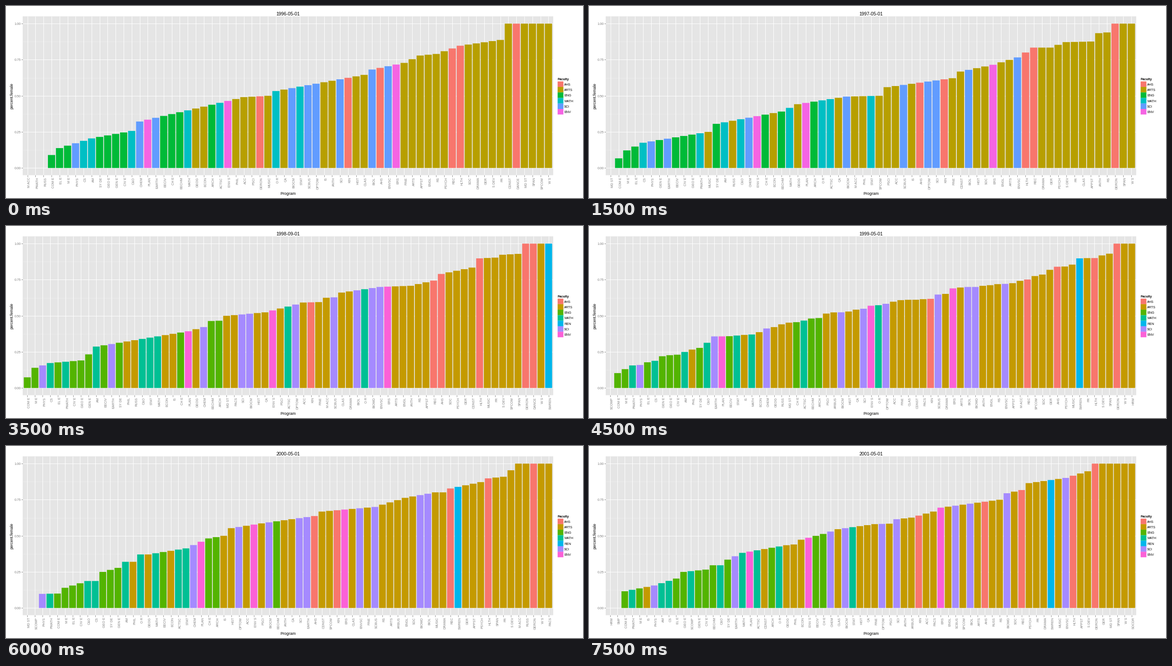
Recreate the animation shown at these times as a matplotlib script. Size 1280x427 px, loop 8000 ms.

```python
import matplotlib.pyplot as plt
import numpy as np
from matplotlib.animation import FuncAnimation
from matplotlib.patches import Rectangle

W, H, DPI = 1280, 427, 64
LEFT, RIGHT, TOP, BOTTOM = 37, 1214, 23, 376.3
Y_ZERO, Y_ONE = 360.3, 39.2
PX = 72 / DPI
GREY = "#7F7F7F"

plt.rcParams["font.family"] = "Liberation Sans"

FACULTY = {
    "AHS": "GERON,KIN,AHS,REC,HLTH,DANCE",
    "ENG": "COM E,EL E,M E,SY DE,GEO E,GEN E,CIV E,EECIV,CH E,EECHM,ARCH",
    "MATH": "PMATH,CS,AM,C&O,MATH,ACTSC,O R,STAT,SCOMP",
    "REN": "SWREN",
    "SCI": "PHYS,CHEM,EARTH,BIOCM,SCBUS,OPTOM,SCI,BIOL,ENVSC,BIOMD",
    "ENV": "PLAN,ENV S,ERS",
}
FACULTY_OF = {p: f for f, codes in FACULTY.items() for p in codes.split(",")}

SIX = dict(AHS="#F8766D", ARTS="#B79F00", ENG="#00BA38", MATH="#00BFC4",
           SCI="#619CFF", ENV="#F564E3")
SEVEN = dict(AHS="#F8766D", ARTS="#C49A00", ENG="#53B400", MATH="#00C094",
             REN="#00B6EB", SCI="#A58AFF", ENV="#FB61D7")

terms = {}


def term(step, codes, knots):
    """Rank the codes; shares (per mille) run straight between the knots."""
    names = codes.split(",")
    at = [names.index(n) for n in knots]
    shares = np.interp(range(len(names)), at, list(knots.values()))
    terms[step] = dict(zip(names, shares))


term(0, "M ACC,PMATH,RUSS,COM E,EL E,M E,PHYS,CS,AM,SY DE,GEO E,GEN E,CIV E,"
     "C&O,CHEM,PLAN,EARTH,EECIV,CH E,EECHM,MATH,GEOG,ECON,ARCH,ACTSC,ENV S,"
     "PHIL,ACC,PSCI,GERON,MUSIC,O R,CA,BIOCM,STAT,SCBUS,OPTOM,IS,ANTH,SCI,"
     "KIN,HIST,CLAS,BIOL,AHS,ENVSC,ERS,FINE,ARTS,APPST,ENGL,RS,PSYCH,REC,"
     "HLTH,SOC,DRAMA,GER,S DEV,FR,CDNST,DANCE,MD ST,SPAN,SPCOM,W S",
     {"RUSS": 0, "COM E": 90, "EL E": 138, "AM": 205, "C&O": 257,
      "CHEM": 322, "ECON": 425, "ACC": 491, "MUSIC": 500, "O R": 533,
      "CLAS": 645, "BIOL": 682, "FINE": 728, "APPST": 779, "RS": 790,
      "HLTH": 847, "FR": 887, "CDNST": 1000})

term(3, "MD ST,COM E,M E,EL E,CS,PHYS,GEN E,EARTH,EECIV,CIV E,GEO E,PMATH,"
     "MUSIC,SY DE,AM,RUSS,C&O,CHEM,ENV S,CH E,ECON,EECHM,MATH,GEOG,PLAN,"
     "ARCH,O R,ACTSC,CA,BIOCM,M ACC,PHIL,STAT,SPCOM,PSCI,ACC,SCBUS,IS,AHS,"
     "OPTOM,SCI,KIN,FINE,CDNST,BIOL,HIST,SOC,ERS,ENGL,ARTS,ENVSC,HLTH,REC,"
     "DRAMA,GER,PSYCH,S DEV,FR,CLAS,APPST,ANTH,RS,GERON,SPAN,W S",
     {"MD ST": 0, "COM E": 67, "M E": 122, "CS": 175, "MUSIC": 250,
      "SY DE": 306, "EECHM": 391, "GEOG": 442, "BIOCM": 495, "SPCOM": 500,
      "PSCI": 560, "FINE": 622, "CDNST": 668, "ERS": 715, "ENVSC": 766,
      "REC": 834, "GER": 834, "S DEV": 872, "APPST": 876, "ANTH": 934,
      "RS": 939, "GERON": 1000})

term(5, "COM E,EL E,M E,PHYS,CS,PMATH,CIV E,C&O,GEN E,EECIV,AM,GEO E,SY DE,"
     "PHIL,RUSS,EARTH,CHEM,CH E,STAT,MATH,ECON,GEOG,EECHM,PLAN,MD ST,IS,"
     "ARCH,ENV S,BIOCM,ACTSC,SCI,O R,CA,HIST,PSCI,ACC,SCBUS,OPTOM,KIN,FINE,"
     "DRAMA,BIOL,CDNST,ENVSC,CLAS,ERS,ENGL,BIOMD,ANTH,ARTS,REC,AHS,APPST,"
     "SOC,RS,PSYCH,SPAN,MUSIC,FR,GER,HLTH,S DEV,GERON,DANCE,SPCOM,W S",
     {"COM E": 83, "EL E": 120, "GEN E": 233, "SY DE": 275, "RUSS": 333,
      "EARTH": 333, "MATH": 391, "PLAN": 409, "ENV S": 509, "CA": 535,
      "HIST": 556, "SCBUS": 566, "KIN": 600, "FINE": 628, "ENVSC": 693,
      "CLAS": 693, "ARTS": 724, "APPST": 764, "RS": 772, "PSYCH": 817,
      "GER": 868, "HLTH": 897, "GERON": 925, "DANCE": 1000})

term(7, "COM E,M E,PHYS,CS,EL E,PMATH,CIV E,GEO E,GEN E,AM,EECIV,EARTH,SY DE,"
     "PHIL,RUSS,C&O,STAT,MATH,ECON,IS,CH E,PLAN,GEOG,CHEM,EECHM,ARCH,MD ST,"
     "PACS,SCI,BIOCM,HIST,CA,ENV S,PSCI,ACTSC,OPTOM,ACC,KIN,FINE,M ACC,"
     "SCBUS,CLAS,DRAMA,BIOL,O R,BIOMD,ENVSC,ERS,ARTS,ENGL,ANTH,RS,APPST,"
     "REC,AHS,SOC,PSYCH,GER,CDNST,HLTH,MUSIC,FR,S DEV,SPCOM,SPAN,"
     "GERON,DANCE,W S,SWREN",
     {"COM E": 74, "M E": 140, "CS": 173, "GEO E": 191, "GEN E": 233,
      "AM": 287, "PLAN": 393, "CHEM": 422, "EECHM": 464, "ARCH": 466,
      "MD ST": 500, "CA": 524, "ACTSC": 564, "ACC": 592, "FINE": 595,
      "M ACC": 625, "SCBUS": 628, "CLAS": 661, "ENVSC": 700, "ANTH": 708,
      "REC": 744, "AHS": 790, "CDNST": 834, "HLTH": 898, "FR": 903,
      "S DEV": 923, "SPAN": 929, "GERON": 1000})

term(10, "SCOMP,COM E,M E,PMATH,PHYS,EL E,CS,GEN E,AM,PHIL,GEO E,CIV E,SY DE,"
     "C&O,PLAN,IS,STAT,MATH,EARTH,EECIV,ECON,CHEM,ACTSC,GEOG,MD ST,EECHM,"
     "CH E,ARCH,RUSS,PSCI,CDNST,O R,ARBUS,BIOCM,HIST,CA,SCI,OPTOM,ENV S,"
     "CLAS,ACC,FINE,KIN,DRAMA,SCBUS,PACS,ERS,ARTS,SPCOM,BIOMD,ANTH,BIOL,"
     "ENGL,RS,APPST,ENVSC,REC,SOC,M ACC,GER,MUSIC,SWREN,PSYCH,AHS,FR,HLTH,"
     "S DEV,SPAN,GERON,W S,HRM",
     {"SCOMP": 0, "COM E": 118, "M E": 126, "AM": 231, "SY DE": 260,
      "PLAN": 340, "IS": 364, "ECON": 397, "GEOG": 429, "MD ST": 429,
      "EECHM": 490, "CDNST": 500, "O R": 518, "HIST": 535, "OPTOM": 586,
      "CLAS": 586, "KIN": 630, "ERS": 684, "SPCOM": 700, "APPST": 723,
      "ENVSC": 732, "M ACC": 801, "SWREN": 847, "AHS": 865, "FR": 898,
      "HLTH": 901, "SPAN": 931, "GERON": 1000})

term(12, "MD ST,SCOMP,PHYS,PMATH,COM E,M E,EL E,CIV E,C&O,CS,GEO E,SY DE,"
     "GEN E,AM,PHIL,O R,GEOG,MATH,EECIV,ECON,ACTSC,STAT,CHEM,PLAN,CH E,ARCH,"
     "IS,HIST,OPTOM,ACC,ENV S,PSCI,BIOCM,EECHM,ANTH,CA,SCI,EARTH,AHS,CDNST,"
     "SPCOM,KIN,ERS,CLAS,ENVSC,FINE,SCBUS,RS,ARTS,ARBUS,ENGL,SOC,BIOMD,BIOL,"
     "MUSIC,DRAMA,REC,SWREN,GER,APPST,PSYCH,HLTH,SPAN,FR,S DEV,"
     "M ACC,RUSS,GERON,W S,PACS",
     {"SCOMP": 0, "PHYS": 98, "COM E": 100, "M E": 140, "C&O": 187,
      "CS": 187, "GEO E": 250, "GEN E": 278, "AM": 320, "PHIL": 320,
      "O R": 371, "GEOG": 371, "STAT": 413, "CH E": 482, "IS": 500,
      "HIST": 553, "PSCI": 586, "AHS": 637, "CDNST": 668, "SCBUS": 700,
      "ENGL": 763, "MUSIC": 801, "DRAMA": 801, "REC": 828, "PSYCH": 872,
      "HLTH": 898, "FR": 909, "S DEV": 954, "M ACC": 1000})

term(15, "HRM,SMF,COM E,PMATH,M E,IS,PHYS,AM,CS,EL E,GEO E,SCOMP,GEN E,CIV E,"
     "EECHM,C&O,SY DE,EARTH,MATH,PLAN,ACTSC,CDNST,ARCH,O R,GEOG,PHIL,ECON,"
     "ENV S,EECIV,CH E,CHEM,CLAS,BIOCM,STAT,HIST,CA,FINE,OPTOM,PSCI,SCI,"
     "ANTH,ARBUS,KIN,ACC,PACS,ERS,ENGL,SCBUS,SPCOM,BIOL,ARTS,AHS,RUSS,RS,"
     "BIOMD,SOC,REC,PSYCH,FR,DRAMA,SWREN,MUSIC,ENVSC,HLTH,APPST,S DEV,"
     "GERON,GER,MD ST,SPAN,W S,SOCDR",
     {"SMF": 0, "COM E": 116, "PHYS": 156, "EL E": 204, "GEO E": 250,
      "CIV E": 266, "EECHM": 296, "C&O": 296, "SY DE": 335, "MATH": 382,
      "GEOG": 435, "PHIL": 440, "ECON": 473, "CH E": 513, "CLAS": 546,
      "FINE": 581, "PSCI": 584, "SCI": 615, "ARBUS": 626, "PACS": 668,
      "ERS": 695, "RS": 750, "BIOMD": 795, "REC": 817, "PSYCH": 865,
      "ENVSC": 901, "S DEV": 947, "GERON": 1000})


def ranking(step):
    """Programs and shares at a step, in ascending order of share."""
    a = max(k for k in terms if k <= step)
    b = min(k for k in terms if k >= step)
    if a == b:
        return list(terms[a].items())
    near, far = (a, b) if step - a <= b - step else (b, a)
    mix = abs(step - near) / (b - a)

    def share(name, v):
        if v in (0, 1000):
            return v
        return v + mix * (terms[far].get(name, v) - v)

    rows = [(n, share(n, v)) for n, v in terms[near].items()]
    return sorted(rows, key=lambda r: r[1])


fig = plt.figure(figsize=(W / DPI, H / DPI), dpi=DPI, facecolor="white")
ax = fig.add_axes([0, 0, 1, 1])


def y_of(share):
    return Y_ZERO + (Y_ONE - Y_ZERO) * share


def box(x, y, w, h, color, z=1):
    ax.add_patch(Rectangle((x, y), w, h, fc=color, lw=0, zorder=z,
                           snap=False))


def label(x, y, s, px, color="black", ha="left", **kw):
    ax.text(x, y, s, fontsize=px * PX, color=color, ha=ha, va="baseline",
            rotation_mode="anchor", **kw)


def legend(colors):
    key = 12.27
    top = 204.5 - key * len(colors) / 2
    label(1224, top - 2.5, "Faculty", 7.2, weight="bold")
    for i, (name, color) in enumerate(colors.items()):
        y = top + i * key
        box(1223.7, y, 12.8, key, color)
        label(1238, y + key / 2 + 2.9, name, 7.3)


def draw(step):
    ax.clear()
    ax.set(xlim=(0, W), ylim=(H, 0))
    ax.axis("off")
    box(LEFT, TOP, RIGHT - LEFT, BOTTOM - TOP, "#E5E5E5")

    rows = ranking(step)
    colors = SIX if step < 7 else SEVEN
    pitch = (RIGHT - LEFT) / (len(rows) + 0.2)
    xs = [LEFT + (0.6 + i) * pitch for i in range(len(rows))]

    ax.hlines([y_of(s / 8) for s in (1, 3, 5, 7)], LEFT, RIGHT,
              color="#F2F2F2", lw=0.6 * PX, zorder=2)
    majors = [y_of(q / 4) for q in range(5)]
    ax.hlines(majors, LEFT, RIGHT, color="white", lw=PX, zorder=2)
    ax.vlines(xs, TOP, BOTTOM, color="white", lw=PX, zorder=2)
    ax.hlines(majors, LEFT - 3.2, LEFT, color=GREY, lw=0.9 * PX)
    ax.vlines(xs, BOTTOM, BOTTOM + 3.2, color=GREY, lw=0.9 * PX)

    for x, (name, share) in zip(xs, rows):
        y = y_of(share / 1000)
        color = colors[FACULTY_OF.get(name, "ARTS")]
        if share:
            box(x - 0.45 * pitch, y, 0.9 * pitch, Y_ZERO - y, color, 3)
        label(x + 5.7, 381, name, 7.2, GREY, "right", rotation=90)

    for q, y in enumerate(majors):
        label(33, y + 2.8, f"{q / 4:.2f}", 7.4, GREY, "right")

    month = 4 + 4 * step
    date = f"{1996 + month // 12}-{month % 12 + 1:02d}-01"
    label(625.7, 20.6, date, 10.3, ha="center")
    label(625.7, 420, "Program", 9, ha="center")
    label(15, 200, "percent.female", 8.7, ha="center", rotation=90)
    legend(colors)
    return []


anim = FuncAnimation(fig, draw, frames=16, init_func=lambda: draw(0),
                     interval=500, repeat=True, repeat_delay=0)
plt.show()
```
